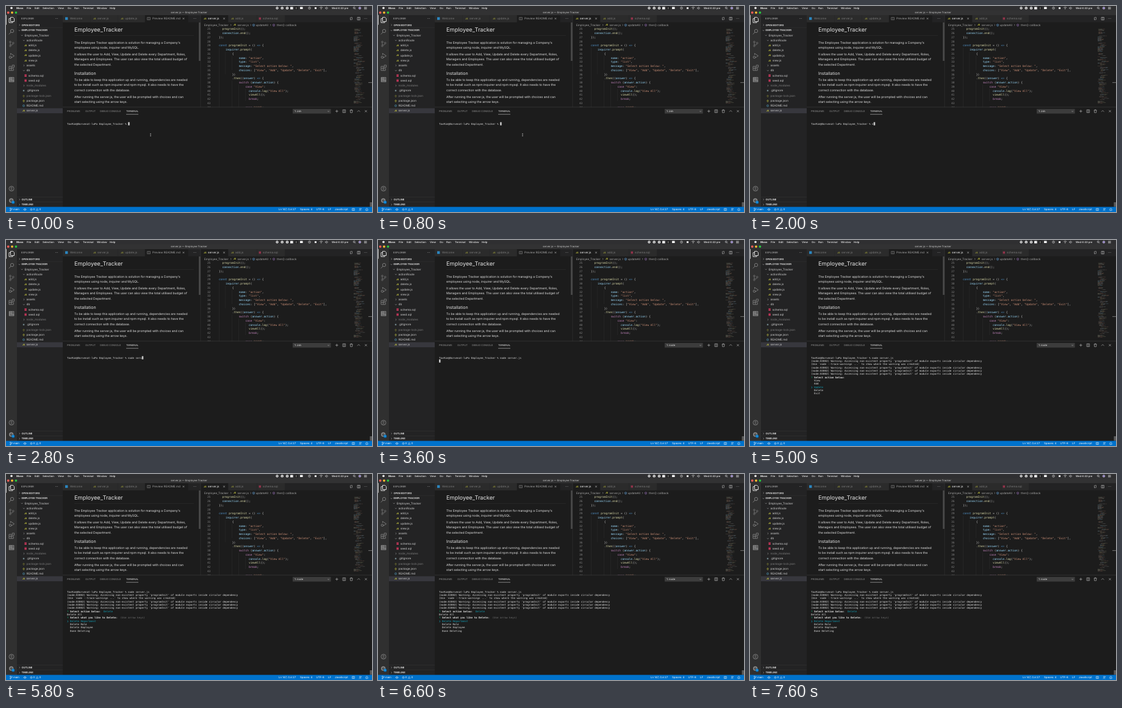
Write an HTML page that moves like this. It is 600x338 px and loops after 8 s.

```html
<!DOCTYPE html>
<html lang="en">
<head>
<meta charset="utf-8">
<title>Employee Tracker</title>
<style>
  html, body { margin: 0; width: 100%; height: 100%; overflow: hidden; background: #1c1c1c; }
  svg { display: block; width: 100%; height: 100%; }
  text { font-family: Inter, "Open Sans", sans-serif; white-space: pre; text-rendering: geometricPrecision; }
  .mono { font-family: "DejaVu Sans Mono", "Liberation Mono", monospace; }
</style>
</head>
<body>
<svg id="stage" viewBox="0 0 600 338"></svg>
<script>
const LOOP = 8000;
const EDITOR = "#1c1c1c", SIDE = "#232324", ACTIVITY = "#303030";
const stage = document.getElementById("stage");
let layer = stage;

function add(tag, attrs, parent = layer) {
  const el = document.createElementNS("http://www.w3.org/2000/svg", tag);
  for (const key in attrs) el.setAttribute(key, attrs[key]);
  return parent.appendChild(el);
}
const rect = (x, y, width, height, fill, more) => add("rect", { x, y, width, height, fill, ...more });
const dot = (cx, cy, r, fill, more) => add("circle", { cx, cy, r, fill, ...more });
const ring = (x, y, r, stroke, width = 0.6) => dot(x, y, r, "none", { stroke, "stroke-width": width });
const line = (d, stroke = "#c5c5c5", width = 0.6) =>
  add("path", { d, stroke, "stroke-width": width, fill: "none" });

// y is the optical middle of the line of text
function text(x, y, string, size, fill = "#d4d4d4", more = {}) {
  const el = add("text", { x, y: y + size * 0.35, "font-size": size, fill, ...more });
  el.textContent = string;
  return el;
}
const bold = { "font-weight": 700 };
const medium = { "font-weight": 500 };

// parts: [string, colour, weight]
function monoLine(x, y, size, parts) {
  const el = text(x, y, "", size, "#d4d4d4", { class: "mono" });
  for (const [string, fill, weight = 400] of parts)
    add("tspan", { fill, "font-weight": weight }, el).textContent = string;
}

function chevron(x, y, open, color = "#c5c5c5") {
  line(open ? `M${x - 1.3} ${y - .6}l1.3 1.4 1.3-1.4` : `M${x - .6} ${y - 1.3}l1.4 1.3-1.4 1.3`, color, 0.5);
}
const cross = (x, y, s = 1.4) => line(`M${x - s} ${y - s}l${2 * s} ${2 * s}M${x + s} ${y - s}l${-2 * s} ${2 * s}`);
const dots = (x, y) => [-1.7, 0, 1.7].forEach(dx => dot(x + dx, y, 0.45, "#c5c5c5"));

function fileIcon(kind, x, y, opacity = 1) {
  if (kind === "js") text(x, y, "JS", 3.5, "#cbcb41", { ...bold, opacity, "text-anchor": "middle" });
  if (kind === "json") text(x, y, "{}", 4, "#cbcb41", { ...bold, opacity, "text-anchor": "middle" });
  if (kind === "git") rect(x - 1.2, y - 1.2, 2.4, 2.4, "#6d8086");
  if (kind === "info") { ring(x, y, 1.6, "#519aba"); line(`M${x} ${y - .9}v.4m0 .3v1.1`, "#519aba"); }
  if (kind === "sql") for (const dy of [-1.9, -0.5, 0.9])
    rect(x - 1.8, y + dy, 3.6, 1.1, "#dd3a62", { rx: 0.4, opacity });
}

function menuBar() {
  rect(0, 0, 600, 7, "#2f2f31");
  rect(0, 7, 600, 8, "#323233");
  const ink = "#f2f2f2";
  dot(9, 3.3, 1.8, ink);
  text(17, 3.3, "Moss", 4.25, ink, bold);
  [["File", 34], ["Edit", 47], ["Selection", 60], ["View", 85], ["Go", 101], ["Run", 112],
   ["Terminal", 126], ["Window", 149], ["Help", 170]]
    .forEach(([label, x]) => text(x, 3.3, label, 4.25, ink, medium));
  dot(444.5, 3.4, 2.1, ink); dot(444.5, 3.4, 0.8, "#2f2f31");
  dot(452.7, 3.4, 2.2, ink); line("M452.7 2v2.6M451.6 3.6l1.1 1.1 1.1-1.1", "#2f2f31", 0.5);
  dot(461, 3.4, 2.2, ink); rect(460.3, 2.7, 1.4, 1.4, "#2f2f31");
  rect(466, 1.4, 4.6, 4, ink, { rx: 0.5 });
  rect(473.5, 1.2, 4.6, 4.6, "#101010");
  line("M474.5 2.4h2.6M474.5 3.6h2.6M474.5 4.8h2.6", ink, 0.4);
  rect(482, 1.5, 4.6, 3.4, ink, { rx: 0.5 });
  ring(497.5, 3.4, 1.8, ink); line("M497.5 2.3v1.2h.9", ink, 0.4);
  rect(506, 2, 3, 3, ink);
  line("M514.3 2.6q2.4-2 4.8 0M515.4 3.9q1.3-1 2.6 0", ink); dot(516.7, 5, 0.5, ink);
  line("M523.5 2.8h1l1.4-1.2v3.8l-1.4-1.2h-1zM527 2.3q1 1.1 0 2.3", ink, 0.5);
  text(534, 3.3, "Wed 6:43 pm", 4.25, ink, medium);
  ring(570.7, 3, 1.4, ink); line("M571.7 4l1.3 1.4", ink);
  dot(580, 3.4, 1.9, "#8c7ac0"); ring(580, 3.4, 1.9, ink, 0.4);
  line("M587 2h4.6M587 3.5h4.6M587 5h4.6", ink);
  dot(3.7, 10.8, 1.9, "#ff5f57"); dot(10, 10.8, 1.9, "#febc2e"); dot(16.4, 10.8, 1.9, "#28c840");
  text(300, 10.8, "server.js — Employee Tracker", 4.25, "#cccccc", { "text-anchor": "middle" });
}

function activityBar() {
  rect(0, 15, 18, 315, ACTIVITY);
  rect(0, 14.8, 0.7, 16, "#ffffff");
  const dim = "#8a8a8a";
  line("M7.5 18.5h4l2 2v5h-6zM7.5 20.7H5v6.6h6v-1.8", "#ffffff", 0.8);
  ring(10, 41, 2.7, dim, 0.8); line("M8 43l-3.2 3.5", dim, 0.8);
  ring(7, 59, 1.3, dim); ring(7, 65.5, 1.3, dim); ring(11.7, 60.8, 1.3, dim);
  line("M7 60.3v3.9M11.7 62.1q0 2-4.7 2", dim);
  line("M7.5 80v-2.2l6 4-5 3.4", dim, 0.8); ring(7, 84, 1.8, dim, 0.8);
  line("M5 99h3.7v6.8H5zM5 102.3h7.2v3.5H8.7M10.2 97h3.4v3.4h-3.4z", dim, 0.8);
  rect(4.8, 116.8, 8.6, 8, dim, { rx: 0.6 });
  line("M6 118.6h2.6M6 121h2.6M6 123.2h6.2M10 118.2h2.2v2.6H10z", ACTIVITY, 0.7);
  ring(9, 299.7, 4, dim, 0.8); ring(9, 298.6, 1.3, dim); line("M6.5 302.5q2.5-3 5 0", dim);
  ring(8.7, 319.2, 2.8, dim, 1.6); ring(8.7, 319.2, 1, dim);
  dot(11.7, 322, 2.5, "#007acc");
  text(11.7, 322, "1", 3.1, "#ffffff", { "text-anchor": "middle" });
}

function sidebar() {
  rect(18, 15, 75, 315, SIDE);
  text(25, 20.6, "EXPLORER", 4.05, "#bbbbbb");
  dots(83, 20.6);
  const section = (y, label, open) => { chevron(22, y, open); text(25.4, y, label, 4.1, "#d4d4d4", bold); };
  section(31.2, "OPEN EDITORS", false);
  section(40, "EMPLOYEE TRACKER", true);
  rect(18, 35.6, 75, 0.3, "#3a3a3b");
  rect(18, 167.8, 75, 8.2, "#37373d");
  // [name, depth, icon or folder state]
  [["Employee_Tracker", 0, "open"], ["actionRoute", 1, "open"], ["add.js", 2, "js"], ["delete.js", 2, "js"],
   ["update.js", 2, "js"], ["view.js", 2, "js"], ["assets", 1, "shut"], ["db", 1, "open"],
   ["schema.sql", 2, "sql"], ["seed.sql", 2, "sql"], ["node_modules", 1, "shut"], [".gitignore", 1, "git"],
   ["package-lock.json", 1, "json"], ["package.json", 1, "json"], ["README.md", 1, "info"], ["server.js", 1, "js"]]
    .forEach(([name, depth, icon], row) => {
      const x = 30.5 + depth * 3.1, y = 48.1 + row * 8.25;
      const ignored = /node_m|-lock/.test(name);
      if (icon === "open" || icon === "shut") chevron(x - 4.3, y, icon === "open");
      else fileIcon(icon, x - 4.6, y, ignored ? 0.6 : 1);
      text(x, y, name, 4.65, ignored ? "#808080" : "#d4d4d4");
    });
  rect(18, 313.2, 75, 0.3, "#414142");
  rect(18, 321.7, 75, 0.3, "#414142");
  section(317.6, "OUTLINE", false);
  section(325.9, "TIMELINE", false);
}

function tab(x, width, label, labelX, active, icon) {
  rect(x, 15, width - 0.4, 11.8, active ? EDITOR : "#2b2b2b");
  if (icon) fileIcon(icon, labelX - 4.7, 20.6, active ? 1 : 0.7);
  text(labelX, 20.6, label, 4.6, active === 2 ? "#ffffff" : active ? "#a8a8a8" : "#7d7d7d");
}

function preview() {
  rect(93, 15, 226, 151, EDITOR);
  rect(93, 15, 226, 11.8, SIDE);
  tab(93, 46, "Welcome", 105, 0);
  rect(97, 18.4, 4.4, 4.4, "#2b86c0");
  tab(139, 45, "server.js", 150, 0, "js");
  tab(184, 44, "update.js", 195, 0, "js");
  tab(228, 71, "Preview README.md", 240, 1);
  line("M231.5 18.7h5v4h-5zM234 18.7v4", "#9a9a9a", 0.5);
  cross(291, 20.6, 1.2);
  dots(309.5, 20.6);
  rect(316, 27, 3, 63, "#464646");
  text(112, 39.2, "Employee_Tracker", 9.25, "#e4e4e4");
  rect(112, 48.2, 196, 0.3, "#3c3c3c");
  text(112, 110.2, "Installation", 7, "#e4e4e4");
  [[60, "The Employee Tracker application is solution for managing a Company's"],
   [68.2, "employees using node, inquirer and MySQL."],
   [79.2, "It allows the user to Add, View, Update and Delete every Department, Roles,"],
   [87.5, "Managers and Employees. The user can also view the total utilised budget of"],
   [95.8, "the selected Department."],
   [121.4, "To be able to keep this application up and running, dependencies are needed"],
   [129.7, "to be install such as npm inquirer and npm mysql. It also needs to have the"],
   [138, "correct connection with the database."],
   [149.4, "After running the server.js, the user will be prompted with choices and can"],
   [157.7, "start selecting using the arrow keys."]]
    .forEach(([y, string]) => text(112, y, string, 5.1, "#e4e4e4"));
}

const PROGRAM = `  programInit();
  connection.end();
});

const programInit = () => {
    inquirer.prompt(
        {
            name: "action",
            type: "list",
            message: "Select action below: ",
            choices: ["View", "Add", "Update", "Delete", "Exit"],
        })
        .then((answer) => {
            switch (answer.action) {
                case "View":
                  console.log("View All");
                  viewAll();
                  break;

                case "Add":`.split("\n");

function highlight(source) {
  const tokens = source.match(/"[^"]*"|\w+(?=\()|\w+|=>|\s+|[^\w\s"]/g) || [];
  return tokens.map(token => [token,
    token[0] === '"' ? "#ce9178" :
    /^(const|=>)$/.test(token) ? "#569cd6" :
    /^(switch|case|break)$/.test(token) ? "#c586c0" :
    /^(programInit|end|prompt|then|log|viewAll)$/.test(token) ? "#dcdcaa" :
    /^\w/.test(token) ? "#9cdcfe" : "#d4d4d4"]);
}

function minimap() {
  let seed = 7;
  const random = () => (seed = seed * 16807 % 2147483647) / 2147483647;
  const palette = ["#ce9178", "#ce9178", "#9cdcfe", "#dcdcaa", "#d4d4d4"];
  let indent = 0;
  for (let y = 36; y < 161; y += 0.85) {
    if (random() < 0.3) { indent = Math.floor(random() * 6) * 1.3; continue; }
    let x = 570 + indent;
    for (let part = 0; part < 1 + random() * 2; part++) {
      const width = 1 + random() * 4;
      rect(x, y, width, 0.5, palette[Math.floor(random() * 5)], { opacity: 0.35 });
      x += width + 0.5;
    }
  }
}

function editor() {
  rect(319, 15, 281, 151, EDITOR);
  rect(319, 15, 281, 11.8, SIDE);
  tab(319.4, 45, "server.js", 331, 2, "js");
  cross(357.5, 20.6);
  tab(364.5, 47, "add.js", 376, 0, "js");
  tab(411.5, 46, "schema.sql", 421, 0, "sql");
  line("M564.5 18.6v4M567.3 18.6v4M564.5 22.6h2M567.3 18.6h-1.8");
  line("M576 18.5h4.4v4.4H576zM578.2 18.5v4.4");
  dots(589.5, 20.6);
  const crumb = "#a9a9a9";
  text(325, 31.2, "Employee_Tracker", 4.6, crumb);
  chevron(368.5, 31.2, false, crumb);
  fileIcon("js", 375, 31.2);
  text(379.5, 31.2, "server.js", 4.6, crumb);
  chevron(401, 31.2, false, crumb);
  const symbol = (x, color) =>
    line(`M${x - 1.6} 30.4l1.6-1 1.6 1v2l-1.6 1-1.6-1zM${x - 1.6} 30.4l1.6 1 1.6-1M${x} 31.4v2`, color, 0.4);
  symbol(406, "#75beff"); text(409.5, 31.2, "updateAll", 4.6, crumb);
  chevron(433.5, 31.2, false, crumb);
  symbol(439, "#b180d7"); text(444, 31.2, "then() callback", 4.6, crumb);

  add("rect", { x: 319, y: 34.5, width: 281, height: 131.5 }, add("clipPath", { id: "view" }));
  const page = stage;
  layer = add("g", { "clip-path": "url(#view)" });
  [[349, 71.6, 166], [359.8, 78.4, 112], [370.6, 85, 105], [370.6, 125.5, 166], [381.5, 132, 166], [392.3, 139, 156]]
    .forEach(([x, top, end]) => rect(x, top - 3, 0.25, end - top + 3, "#404040"));
  PROGRAM.forEach((source, i) => {
    const y = 37.9 + i * 6.75;
    text(335.3, y, String(25 + i), 4.5, "#858585", { class: "mono", "text-anchor": "end" });
    monoLine(349, y, 4.52, highlight(source));
  });
  minimap();
  layer = page;
  rect(594, 125.3, 6, 0.8, "#8a8a8a");
}

function panel() {
  rect(93, 166, 507, 164, EDITOR);
  rect(93, 165.7, 507, 0.5, "#454545");
  rect(318.8, 15, 0.4, 151, "#414141");
  [["PROBLEMS", 100], ["OUTPUT", 130], ["DEBUG CONSOLE", 154], ["TERMINAL", 197]]
    .forEach(([label, x]) => text(x, 172.6, label, 4, label === "TERMINAL" ? "#e7e7e7" : "#969696"));
  rect(197, 177.6, 20, 0.5, "#e7e7e7");
  rect(470, 168.9, 62.6, 7.6, "#3c3c3c");
  chevron(528.6, 172.6, true);
  line("M542.3 170.3v4.6M540 172.6h4.6");
  line("M552 170.3h4.6v4.6H552zM554.3 170.3v4.6");
  line("M563.8 171h4.6M565.3 171v-.8h1.6v.8M564.3 171l.3 4h3l.3-4");
  line("M576 173.6l2.2-2.2 2.2 2.2");
  cross(590, 172.6, 1.7);
  rect(596.5, 322, 3.5, 7.6, "#5a5a5a");
}

function statusBar() {
  rect(0, 329.6, 600, 8.4, "#0072cc");
  const y = 333.9, white = "#ffffff";
  ring(7.2, 332.2, 0.7, white, 0.5); ring(7.2, 335.7, 0.7, white, 0.5); ring(9.6, 333, 0.7, white, 0.5);
  line("M7.2 332.9v2.1M9.6 333.7q0 1-2.4 1", white, 0.4);
  ring(31, y, 1.5, white, 0.5); line("M28.6 333.9h1.8M31.6 333.9h1.8", white, 0.5);
  ring(41.5, y, 1.6, white, 0.4); line("M40.8 333.2l1.4 1.4M42.2 333.2l-1.4 1.4", white, 0.4);
  line("M49.3 335.3l1.8-3 1.8 3z", white, 0.4);
  [["main", 12], ["0", 44.4], ["0", 54.6], ["Ln 147, Col 27", 447], ["Spaces: 4", 482],
   ["UTF-8", 508.5], ["LF", 528], ["JavaScript", 539]]
    .forEach(([label, x]) => text(x, y, label, 4.3, white));
  line("M567.4 332.2h4v3.3h-4zM569.4 332.2v3.3", white, 0.5);
  ring(580.5, 333, 1, white, 0.5); line("M578.7 335.9q1.8-2.4 3.6 0M582.5 332v1.4", white, 0.5);
  line("M589.4 335.1q.7-.5.7-1.8a1.4 1.4 0 0 1 2.8 0q0 1.3.7 1.8zM590.9 335.9h1.2", white, 0.5);
}

const CELL = 2.504, LEFT = 100, SIZE = 4.16;
const WHITE = "#e2e2e2", CYAN = "#11a0b8", GREEN = "#0dbc79", GREY = "#757575";
const PROMPT = "TavRim@Dorvenat-luPo Employee_Tracker % ";
const COMMAND = "node server.js";
const rowY = row => 193.2 + row * 5.33;
const print = (row, ...parts) => monoLine(LEFT, rowY(row), SIZE, parts);
const caret = (column, row) => rect(LEFT + column * CELL, rowY(row) - 2.6, CELL, 5.2, "#c8c8c8");

const question = (row, label, answer, color) =>
  print(row, ["? ", GREEN], [label, WHITE, 700], ["  " + answer, color]);

function choices(row, labels, selected) {
  labels.forEach((label, i) => {
    const color = i === selected ? CYAN : WHITE;
    if (i === selected) print(row + i, ["❯", CYAN]);
    monoLine(LEFT + 2 * CELL, rowY(row + i), SIZE, [[label, color]]);
  });
}

function stateAt(t) {
  const typed = t < 2000 ? 0 : Math.min(COMMAND.length, 1 + Math.floor((t - 2000) / 1200 * 13));
  return {
    typed,
    entered: t >= 3400,
    running: t >= 3600,
    menu: t >= 3800,
    selected: [4700, 5000, 5200].filter(at => t >= at).length,
    chosen: t >= 5600,
  };
}

function drawTerminal({ typed, entered, running, menu, selected, chosen }) {
  text(473, 172.6, running ? "1: node" : "1: zsh", 4.2, "#f0f0f0");
  print(0, [PROMPT + COMMAND.slice(0, typed), WHITE]);
  if (!menu) {
    if (entered) caret(0, 1);
    else caret(PROMPT.length + typed, 0);
    if (!typed) line("M236.1 209.3q.9 0 .9.8v2.6q0 .8-.9.8M237.9 209.3q-.9 0-.9.8M237 212.7q0 .8.9.8", "#e0e0e0", 0.5);
    return;
  }
  for (const row of [1, 3, 4, 5])
    print(row, ["(node:83002) Warning: Accessing non-existent property 'programInit' of module exports inside circular dependency", WHITE]);
  print(2, ["(Use `node --trace-warnings ...` to show where the warning was created)", WHITE]);
  const hint = "(Use arrow keys)";
  if (chosen) {
    question(6, "Select action below:", "Delete", CYAN);
    print(7, ["Delete All", WHITE]);
    question(8, "Select what you like to Delete:", hint, GREY);
    choices(9, ["Delete Department", "Delete Role", "Delete Employee", "Done Deleting"], 0);
  } else {
    question(6, "Select action below:", selected ? "" : hint, GREY);
    choices(7, ["View", "Add", "Update", "Delete", "Exit"], selected);
  }
}

menuBar();
activityBar();
sidebar();
preview();
editor();
panel();
statusBar();
layer = add("g", {});

let shown = "";
function frame() {
  const state = stateAt(performance.now() % LOOP);
  const key = JSON.stringify(state);
  if (key !== shown) {
    shown = key;
    layer.replaceChildren();
    drawTerminal(state);
  }
  requestAnimationFrame(frame);
}
frame();
</script>
</body>
</html>
```
